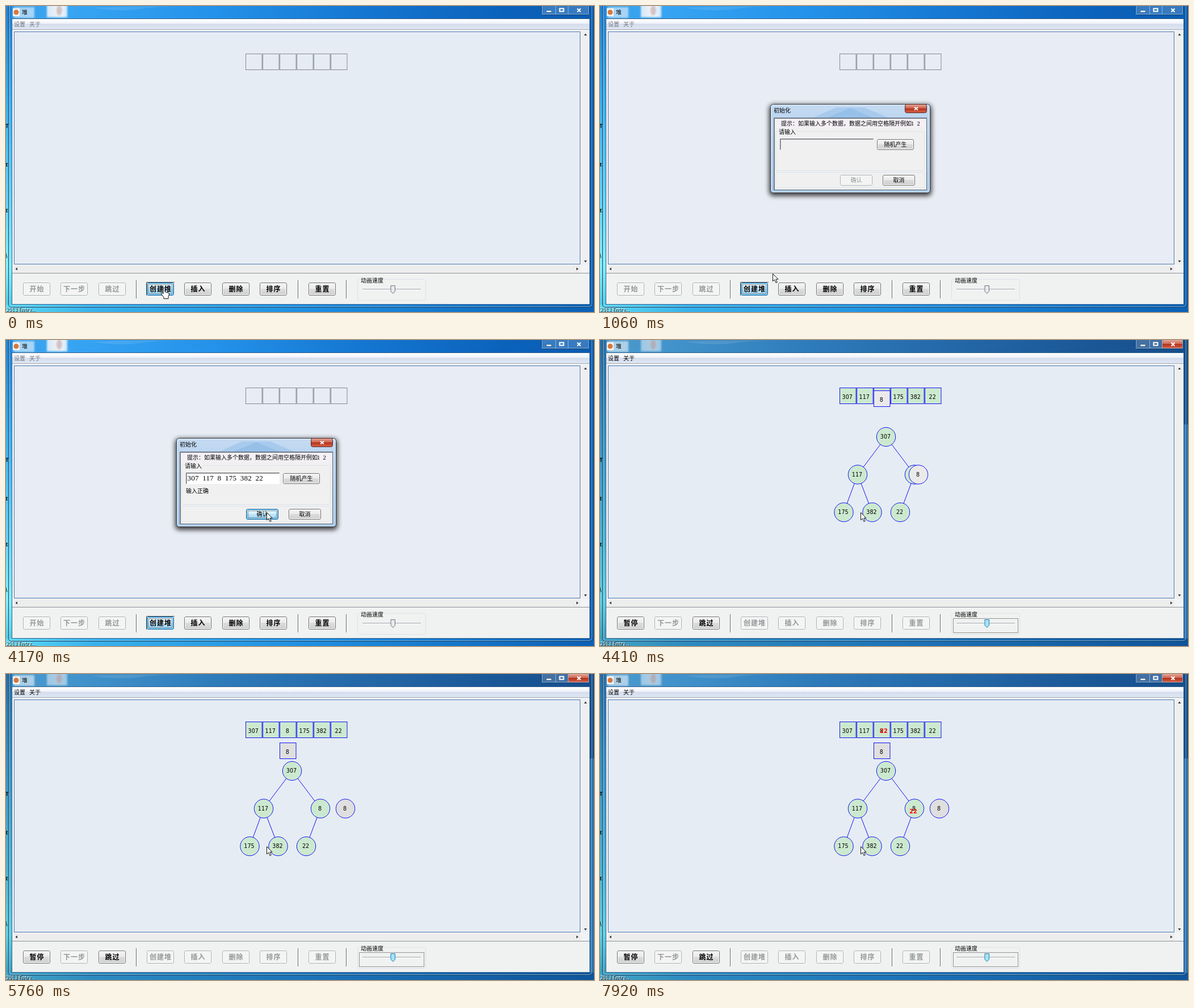
Recreate the animation shown at these times as an HTML page. Size 1036 px wide and 540 px high, loop 8000 ms.

```html
<!DOCTYPE html>
<html lang="zh">
<head>
<meta charset="utf-8">
<title>堆</title>
<style>
html, body { margin: 0; width: 100%; height: 100%; overflow: hidden; background: #1b87e0; }
svg { display: block; width: 100%; height: 100%; }
text { font-family: "Noto Sans CJK SC", "Noto Sans CJK", sans-serif; white-space: pre; }
.num { font-family: "DejaVu Sans", sans-serif; font-size: 9.6px; text-anchor: middle; }
.red { fill: #f00; font-weight: bold; }
.song { font-family: "Liberation Serif", serif; }
.node { stroke: #1212f5; stroke-width: 1; }
</style>
</head>
<body>
<svg id="stage" viewBox="0 0 1036 540"></svg>
<script>
const LOOP = 8000, RUN_AT = 4280;
const VALUES = [307, 117, 8, 175, 382, 22];
const NODES = [[504, 171], [454, 237.5], [554, 237.5], [429.5, 304], [479.5, 304], [529, 304]];
const GREEN = '#cce9cf';

const rect = (x, y, w, h, fill, more = '') =>
  `<rect x="${x}" y="${y}" width="${w}" height="${h}" fill="${fill}" ${more}/>`;
const line = (d, stroke, more = '') => `<path d="${d}" fill="none" stroke="${stroke}" ${more}/>`;
const text = (x, yMid, str, size = 10, more = '') =>
  `<text x="${x}" y="${yMid + size * 0.37}" font-size="${size}" ${more}>${str}</text>`;
const group = (id, body, more = '') => `<g id="${id}" ${more}>${body}</g>`;
const gradient = (id, dir, stops) =>
  `<linearGradient id="${id}" x2="${dir === 'x' ? 1 : 0}" y2="${dir === 'y' ? 1 : 0}">` +
  stops.map(([o, c]) => `<stop offset="${o}" stop-color="${c}"/>`).join('') + '</linearGradient>';

const defs = '<defs>' +
  gradient('sky', 'x', [[0, '#3a9fe8'], [.1, '#38a5f3'], [.35, '#2492ea'], [.6, '#1577d2'], [.85, '#0b62bb'], [1, '#0b5cb0']]) +
  gradient('skyActive', 'x', [[0, '#4d9bcd'], [.12, '#4293cb'], [.35, '#2f7cbb'], [.6, '#2468a8'], [.85, '#1a5696'], [1, '#174e8a']]) +
  gradient('left', 'y', [[0, '#2383d4'], [.3, '#3aaef0'], [.65, '#64d5f6'], [.85, '#82f2fd'], [1, '#48c6e2']]) +
  gradient('leftActive', 'y', [[0, '#2c6ea4'], [.3, '#3b93c4'], [.65, '#4db6d4'], [.85, '#62d2e2'], [1, '#3597b6']]) +
  gradient('base', 'x', [[0, '#5cdcf4'], [.15, '#38b1ec'], [.5, '#2090e2'], [1, '#0c60b5']]) +
  gradient('menu', 'y', [[0, '#fff'], [.42, '#f0f3fa'], [.5, '#d5dded'], [1, '#dfe6f3']]) +
  gradient('btn', 'y', [[0, '#f4f4f4'], [.48, '#ebebeb'], [.5, '#dcdcdc'], [1, '#cfcfcf']]) +
  gradient('hot', 'y', [[0, '#e8f5fd'], [.48, '#d6effc'], [.5, '#bce4fb'], [1, '#a6d8f4']]) +
  gradient('close', 'y', [[0, '#e5a596'], [.45, '#cc6753'], [.5, '#b5301a'], [1, '#d4664c']]) +
  gradient('glass', 'y', [[0, '#c5dbf2'], [.15, '#bdd6f0'], [1, '#a9caec']]) +
  gradient('photo', 'x', [[0, '#dff0fc'], [.3, '#f5f4f5'], [.7, '#fff'], [1, '#d8ecfb']]) +
  '<filter id="soft" x="-20%" y="-20%" width="140%" height="140%"><feGaussianBlur stdDeviation="4"/></filter>' +
  '<filter id="haze" x="-50%" y="-50%" width="200%" height="200%"><feGaussianBlur stdDeviation="1.5"/></filter></defs>';

function winButtons(active) {
  return rect(943.5, -4, 84, 19.5, '#fff', 'fill-opacity=".18" stroke="#0b3c70" rx="4"') +
    (active ? rect(991, 0, 36, 15, 'url(#close)', 'rx="2"') : '') +
    line('M944.5 0V14.5H1026.5V0M968.5 0V15M990.5 0V15', '#b4d4f0', 'stroke-opacity=".65"') +
    rect(952, 8, 9, 3, '#fff', 'stroke="#36506e" stroke-width=".6"') +
    rect(975.5, 4.5, 7, 5, 'none', 'stroke="#fff" stroke-width="2"') +
    line('M1006.5 4.5l6 6m0-6l-6 6', '#fff', 'stroke-width="2"');
}

function frame(active) {
  const suffix = active ? 'Active' : '';
  return rect(0, 0, 1036, 540, `url(#sky${suffix})`) +
    rect(0, 0, 11, 540, `url(#left${suffix})`) +
    `<path d="M150 3q50 8 90 2t90 0q-60 -7 -180 -2z" fill="#fff" opacity=".1"/>` +
    rect(72, -4, 36, 24, 'url(#photo)', `filter="url(#haze)" opacity="${active ? .55 : .92}"`) +
    `<ellipse cx="94" cy="8" rx="5" ry="9" fill="#b98f8c" opacity=".5" filter="url(#haze)"/>` +
    rect(14, 2, 36, 19, '#fff', 'opacity=".55" filter="url(#haze)"') +
    rect(0, 527, 1036, 13, 'url(#base)') +
    (active ? rect(0, 527, 1036, 13, '#17406a', 'opacity=".35"') + rect(1029, 149, 7, 378, '#55a5e2', 'opacity=".5"') : '') +
    line('M4.5 0V526q0 5.500 5 5.500H1028q5.500 0 5.500 -5.500V0', '#123a5e') +
    line('M5.500 0V525q0 5.500 5 5.500H1027q5.500 0 5.500 -5.500V0', '#a8dcf7', 'opacity=".65"') +
    winButtons(active) +
    rect(12, 4, 12, 14, '#f3f3f3') + '<circle cx="18" cy="11" r="4.5" fill="#d8783c"/>' +
    text(28, 11, '堆');
}

const desktopLabels =
  ['T', 'ε', 'ε', '\\'].map((s, i) => text(-1, [212, 280, 361, 440][i], s, 9, 'font-weight="bold"')).join('') +
  text(1, 537, '2013 Entry...', 9) + text(0, 536, '2013 Entry...', 9, 'fill="#fff"');

const triangle = (x, y, turn) =>
  `<path d="M-2 2.500L1.500 0 -2 -2.500z" transform="translate(${x} ${y}) rotate(${turn})" fill="#333"/>`;

const client =
  rect(10.5, 22.5, 1018, 504, '#f0f0f0', 'stroke="#2f5f8c"') +
  rect(11, 23, 1017, 18, 'url(#menu)') + rect(11, 41, 1017, 1, '#a5aab4') +
  rect(11, 42, 1017, 430, '#f1f3f5') +
  rect(14.5, 45.5, 997, 410, '#e6ecf4', 'id="canvas" stroke="#4976ae"') +
  rect(1013, 45, 15, 411, '#efefef') + rect(14, 457, 998, 14, '#ededed') +
  triangle(18, 464, 180) + triangle(1007, 464, 0) + triangle(1021, 50, -90) + triangle(1021, 451, 90) +
  rect(11, 471, 1017, 1, '#8b9096') + rect(11, 472, 1017, 54, '#f0f2f1') +
  [230, 515, 600].map(x => line(`M${x - .5} 484V516`, '#606468') + line(`M${x + .5} 484V516`, '#fff')).join('');

// kinds: on, off, hot
function button(x, y, w, h, label, kind, bold) {
  const off = kind === 'off', hot = kind === 'hot';
  const fill = off ? '#f3f4f3' : `url(#${hot ? 'hot' : 'btn'})`;
  const edge = off ? '#abb1b5' : hot ? '#2d70a5' : '#707070';
  const inner = hot ? '#49b4e6' : '#fbfbfb';
  const font = bold ? 'font-weight="bold" letter-spacing="1"' : '';
  return rect(x + .5, y + .5, w - 1, h - 1, fill, `stroke="${edge}" rx="2.5"`) +
    rect(x + 1.5, y + 1.5, w - 3, h - 3, 'none', `stroke="${inner}" rx="1.500"`) +
    text(x + w / 2 + (bold ? .5 : 0), y + h / 2, label, bold ? 12 : 10,
      `text-anchor="middle" fill="${off ? '#949898' : '#000'}" ${font}`);
}

const focusRing = (x, y, w, h) => rect(x, y, w, h, 'none', 'stroke="#333" stroke-dasharray="1 1"');

const SLOTS = [30, 96, 163, 248, 314, 381, 447, 533];
const LABELS = ['开始', '下一步', '跳过', '创建堆', '插入', '删除', '排序', '重置'];

function toolbar(running) {
  const kind = i => running ? (i === 0 || i === 2 ? 'on' : 'off') : i < 3 ? 'off' : i === 3 ? 'hot' : 'on';
  const buttons = SLOTS.map((x, i) =>
    button(x, 488, 48, 23, running && !i ? '暂停' : LABELS[i], kind(i), true)).join('');
  return buttons +
    (running ? '' : line('M247.500 511V487.500H297', '#555') + focusRing(251.5, 491.5, 41, 16)) +
    rect(619.5, 482.5, 120, 37, 'none', 'stroke="#dce1e8" rx="3"') +
    rect(623, 480, 43, 6, '#f0f2f1') + text(625, 484, '动画速度') +
    rect(628, 499, 103, 1.5, '#aeb4b8') + rect(628, 500.5, 103, 1, '#fff') +
    `<path d="M678 493.500h7.500v10l-3.750 4 -3.750 -4z" fill="${running ? '#a5e2f8' : '#e6e8e9'}" stroke="${running ? '#1d7fae' : '#6f767b'}"/>` +
    (running ? focusRing(622.5, 491.5, 114, 25) : '') +
    text(14, 32, '设置', 10, `fill="${running ? '#000' : '#70757c'}"`) +
    text(41, 32, '关于', 10, `fill="${running ? '#000' : '#70757c'}"`);
}

const cellX = i => 422.5 + 30 * i;
const cell = (i, fill, stroke) => rect(cellX(i), 84.5, 28.5, 28, fill, `stroke="${stroke}"`);
const num = (x, y, v, more = '') => `<text class="num ${more}" x="${x}" y="${y + 3.5}">${v}</text>`;
const cellNum = i => num(cellX(i) + 13.2, 100, VALUES[i]);
const disc = (i, fill) => {
  const [x, y] = NODES[i];
  return `<circle class="node" cx="${x}" cy="${y}" r="16.7" fill="${fill}"/>` + num(x - 1, y - .5, VALUES[i]);
};

const emptyCells = VALUES.map((_, i) => cell(i, 'none', '#858895')).join('');
const edges = NODES.slice(1).map(([x, y], i) => {
  const [px, py] = NODES[i >> 1];
  return line(`M${px} ${py}L${x} ${y}`, '#1212f5');
}).join('');
const heap =
  VALUES.map((_, i) => cell(i, GREEN, '#1212f5') + cellNum(i)).join('') +
  edges + NODES.map((_, i) => disc(i, GREEN)).join('') +
  group('tempCell', cell(2, 'inherit', '#1212f5') + cellNum(2)) +
  group('tempNode', disc(2, 'inherit')) +
  group('rise', num(0, 0, 22, 'red') ) + group('slide', num(0, 0, 22, 'red'));

const dialog =
  rect(298, 174, 286, 161, '#000', 'rx="7" opacity=".75" filter="url(#soft)"') +
  rect(300.5, 173.5, 281, 156, 'url(#glass)', 'rx="5" stroke="#2b343e"') +
  rect(301.5, 174.5, 279, 154, 'none', 'rx="4" stroke="#eaf4fd"') +
  '<path d="M376 197l40 -18h50l42 18z" fill="#9fc6ec" opacity=".75"/><path d="M400 197l41 -17 40 17z" fill="#8dbbe8" opacity=".6"/>' +
  text(306, 184.5, '初始化') +
  rect(537.5, 173.5, 38, 15, 'url(#close)', 'stroke="#5c2a26" rx="3"') +
  line('M554 178.500l6 5m0 -5l-6 5', '#fff', 'stroke-width="1.800"') +
  rect(306.5, 197.5, 269, 127, '#f0f0f0', 'stroke="#5f6d7d"') +
  line('M307.500 324V198.500H575', '#8b8e93') +
  rect(309, 200, 265, 15, '#f4f0f5') +
  text(319, 207.5, '提示：如果输入多个数据，数据之间用空格隔开例如') +
  text(548, 207.5, '1 2', 10.5, 'class="song" word-spacing="2.6"') +
  rect(309.5, 221.5, 262, 69, 'none', 'stroke="#dce3ea" rx="2"') +
  rect(313, 218, 34, 8, '#f0f0f0') + text(315, 222.5, '请输入') +
  rect(309.5, 293.5, 263, 27, 'none', 'stroke="#dfe5eb" rx="2"') +
  rect(317, 234, 165, 20, '#f0f0f0', 'id="field"') +
  rect(319, 236, 30, 17, '#fff', 'id="cleared"') +
  line('M317.500 254V234.500H482', '#6d7075') + line('M318.500 253V235.500H481', '#a9abad') +
  rect(320, 236, 1, 14, '#222', 'id="caret"') +
  group('typed', text(319.5, 243.5, VALUES.join(' '), 13, 'class="song" letter-spacing=".2" word-spacing="3.25"') +
    text(317, 266, '输入正确')) +
  group('randomOn', button(488, 235, 65, 19, '随机产生', 'on')) +
  group('randomHot', button(488, 235, 65, 19, '随机产生', 'hot')) +
  group('okOff', button(423, 298, 57, 19, '确认', 'off')) +
  group('okOn', button(423, 298, 57, 19, '确认', 'on')) +
  group('okHot', button(423, 298, 57, 19, '确认', 'hot') + focusRing(426.5, 301.5, 50, 12)) +
  button(498, 298, 57, 19, '取消', 'on');

const pointer = (id, d) => group(id, `<path d="${d}" fill="#fff" stroke="#111" stroke-width="1" stroke-linejoin="round"/>`);

const stage = document.getElementById('stage');
stage.innerHTML = defs +
  group('idleFrame', frame(false)) + group('activeFrame', frame(true)) + desktopLabels + client +
  group('idleBar', toolbar(false)) + group('activeBar', toolbar(true)) +
  group('empty', emptyCells) + group('heap', heap) + group('dialog', dialog) +
  pointer('hand', 'M277 498.500q1.500 -2 3 0v6l5.500 1.500q2 .8 2 3l-1.500 4v3.500h-8v-2.500l-4.500 -6q-.5 -2 2 -1.500l1.500 1.500z') +
  pointer('arrow', 'M.5 .5V13.800L3.500 11 6 16.500 8.200 15.500 5.800 10.200H10z');

const el = {};
stage.querySelectorAll('[id]').forEach(n => el[n.id] = n);
const show = (id, on) => el[id].setAttribute('display', on ? 'inline' : 'none');
const place = (id, x, y) => el[id].setAttribute('transform', `translate(${x} ${y})`);
const clamp = v => Math.min(1, Math.max(0, v));
const mix = (a, b, p) => a + (b - a) * p;

// the screen refreshes in steps of about 130 ms
const tick = t => {
  const [base, step] = t < 4000 ? [1770, 131] : [4000, 134.5];
  return base + step * Math.floor((t - base) / step);
};

const PATH = [[670, 277, 498], [1060, 310, 466], [1640, 310, 466], [1770, 338, 452], [1890, 393, 420],
  [2040, 483, 350], [2300, 501, 275], [2425, 501, 251], [2730, 512, 243], [2980, 512, 243], [3590, 459, 304]];

function pointerAt(t) {
  const i = PATH.findIndex(k => k[0] > t);
  if (i === 0) return PATH[0].slice(1);
  if (i < 0) return PATH[PATH.length - 1].slice(1);
  const [t0, x0, y0] = PATH[i - 1], [t1, x1, y1] = PATH[i];
  const p = (t - t0) / (t1 - t0);
  return [Math.round(mix(x0, x1, p)), Math.round(mix(y0, y1, p))];
}

function drawDialog(t) {
  const open = t < 400 ? 0 : t < 550 ? .4 : t < 670 ? .78 : 1;
  const scale = mix(.87, 1, open);
  show('dialog', open > 0 && t < RUN_AT);
  el.dialog.setAttribute('opacity', open);
  el.dialog.setAttribute('transform', `translate(440.5 251.5) scale(${scale}) translate(-440.5 -251.5)`);
  const typed = t >= 2960;
  const overRandom = t >= 2560 && t < 3230;
  const overOk = t >= 3500;
  show('typed', typed);
  el.field.setAttribute('fill', typed ? '#fff' : '#f0f0f0');
  show('cleared', t >= 1770);
  show('caret', t < 1060 || (t >= 1490 && t < 1770));
  show('randomOn', !overRandom);
  show('randomHot', overRandom);
  show('okOff', !typed);
  show('okOn', typed && !overOk);
  show('okHot', overOk);
}

function drawHeap(now) {
  const out = clamp((now - 4215) / 1257);
  const shade = Math.round(mix(236, 223, out));
  place('tempCell', 0, Math.floor(37 * out));
  place('tempNode', Math.round(44 * out), 0);
  el.tempCell.setAttribute('fill', `rgb(${shade},${shade},${shade})`);
  el.tempNode.setAttribute('fill', `rgb(${shade},${shade},${shade})`);
  // numbers inside the temporary shapes stay black
  ['tempCell', 'tempNode'].forEach(id => el[id].querySelector('text').setAttribute('fill', '#000'));
  const up = clamp((now - 6725) / 1257);
  show('rise', up > 0);
  show('slide', up > 0);
  place('rise', Math.round(mix(528, 553.5, up)), Math.round(mix(303.5, 237.5, up)));
  place('slide', Math.round(mix(586, 494, up)), 100.5);
}

function render(t) {
  const running = t >= RUN_AT, now = tick(t);
  show('idleFrame', !running);
  show('activeFrame', running);
  show('idleBar', !running);
  show('activeBar', running);
  show('empty', !running);
  show('heap', running);
  el.canvas.setAttribute('fill', t >= 400 && !running ? '#e8ecf4' : '#e6ecf4');
  show('hand', t < 400);
  show('arrow', t >= 400);
  place('arrow', ...pointerAt(now));
  drawDialog(t);
  if (running) drawHeap(now);
}

const start = performance.now();
function loop() {
  render((performance.now() - start) % LOOP);
  requestAnimationFrame(loop);
}
loop();
</script>
</body>
</html>
```
